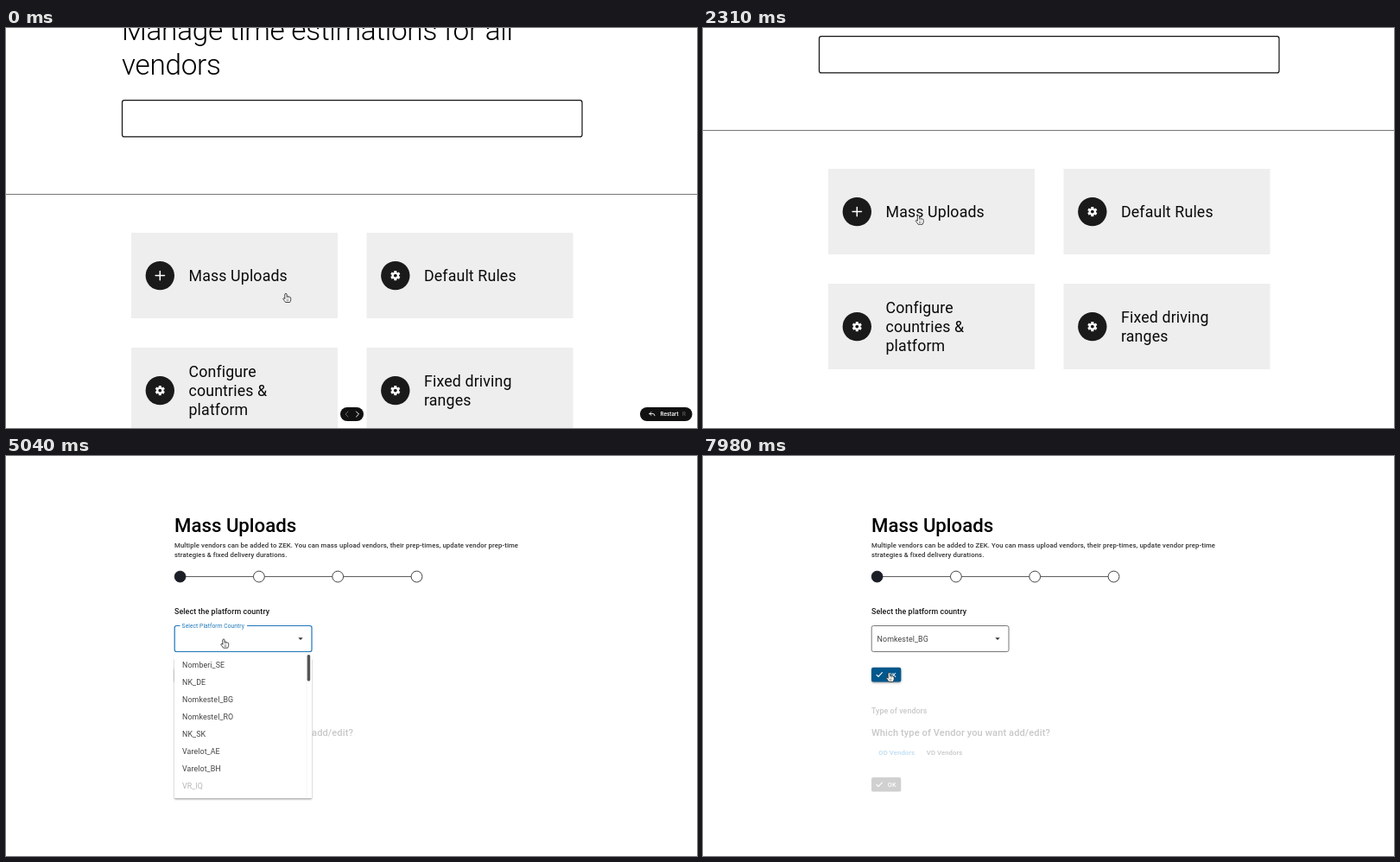
Write an HTML page with a canvas that moves like this. It is 800 by 463 pixels and loops after 8 s.

```html
<!DOCTYPE html>
<html lang="en">
<head>
<meta charset="utf-8">
<title>Mass uploads</title>
<style>
  html, body { margin: 0; width: 100%; height: 100%; overflow: hidden; background: #fff; }
  canvas { display: block; width: 800px; height: 463px; }
</style>
</head>
<body>
<canvas id="stage"></canvas>
<script>
const W = 800, H = 463, LOOP = 8000, STEP = 70;
const PAGE_SWAP = 2450, LIST_OPEN = 4830, LIST_CLOSE = 6510;
const INK = '#1b1e26', BLUE = '#1f78b8';
const canvas = document.getElementById('stage');
const ctx = canvas.getContext('2d');
const dpr = window.devicePixelRatio || 1;
canvas.width = W * dpr;
canvas.height = H * dpr;

const clamp = v => Math.max(0, Math.min(1, v));
const easeOut = p => 1 - (1 - p) ** 3;
const smooth = p => p * p * (3 - 2 * p);

// Pointer tip: time, x, y
const route = [
  [0, 324, 307.2], [630, 299, 250], [910, 296, 247], [1540, 249.5, 217],
  [3500, 249.5, 217], [4130, 232, 191.5], [4340, 232, 191.5], [4690, 252, 210],
  [5110, 252, 212], [5880, 242, 271.7], [6090, 242, 271.7], [6370, 243, 279],
  [6650, 243, 279], [7420, 215.5, 251], [LOOP, 215.5, 251]
];

function pointerAt(t) {
  const i = Math.max(1, route.findIndex(k => k[0] > t));
  const [t0, x0, y0] = route[i - 1], [t1, x1, y1] = route[i];
  const p = smooth(clamp((t - t0) / (t1 - t0)));
  return { x: x0 + (x1 - x0) * p, y: y0 + (y1 - y0) * p };
}

const inside = (p, x, y, w, h) => p.x >= x && p.x <= x + w && p.y >= y && p.y <= y + h;

function text(str, x, y, size, { weight = 400, color = '#0a0a0a', gap = 0, family = 'Roboto' } = {}) {
  ctx.font = `${weight} ${size}px ${family}, sans-serif`;
  ctx.letterSpacing = gap + 'px';
  ctx.fillStyle = color;
  ctx.fillText(str, x, y);
}

function box(x, y, w, h, r, fill, stroke, line = 1) {
  ctx.beginPath();
  ctx.roundRect(x, y, w, h, r);
  if (fill) { ctx.fillStyle = fill; ctx.fill(); }
  if (stroke) { ctx.strokeStyle = stroke; ctx.lineWidth = line; ctx.stroke(); }
}

function disc(x, y, r, fill, stroke) {
  ctx.beginPath();
  ctx.arc(x, y, r, 0, Math.PI * 2);
  ctx.fillStyle = fill;
  ctx.fill();
  if (stroke) { ctx.strokeStyle = stroke; ctx.lineWidth = 0.9; ctx.stroke(); }
}

function path(d, x, y, { fill, stroke, line = 1 }) {
  const shape = new Path2D(d);
  ctx.save();
  ctx.translate(x, y);
  ctx.lineJoin = ctx.lineCap = 'round';
  if (fill) { ctx.fillStyle = fill; ctx.fill(shape); }
  if (stroke) { ctx.strokeStyle = stroke; ctx.lineWidth = line; ctx.stroke(shape); }
  ctx.restore();
}

function withShadow(color, blur, dy, draw) {
  ctx.save();
  ctx.shadowColor = color;
  ctx.shadowBlur = blur * dpr;
  ctx.shadowOffsetY = dy * dpr;
  draw();
  ctx.restore();
}

function gear(x, y) {
  ctx.save();
  ctx.translate(x, y);
  disc(0, 0, 4.2, '#fff');
  for (let i = 0; i < 6; i++) {
    ctx.fillRect(-1.5, -5.6, 3, 3);
    ctx.rotate(Math.PI / 3);
  }
  disc(0, 0, 1.9, '#1a1a1a');
  ctx.restore();
}

function card(x, y, lines, icon) {
  ctx.fillStyle = '#eee';
  ctx.fillRect(x, y, 239, 99);
  const cx = x + 33.3, cy = y + 49.6;
  disc(cx, cy, 16.7, '#1a1a1a');
  if (icon === 'plus') path('M-5.2 0H5.2M0-5.2V5.2', cx, cy, { stroke: '#fff', line: 1.5 });
  else gear(cx, cy);
  lines.forEach((s, i) =>
    text(s, x + 66.5, cy + 6.2 + (i - (lines.length - 1) / 2) * 22, 17.78, { gap: 0.14 }));
}

function homePage(scroll) {
  ctx.save();
  ctx.translate(0, -scroll);
  const title = { weight: 300, color: '#000', gap: -0.278 };
  text('Manage time estimations for all', 134, 13.5, 33.3, title);
  text('vendors', 134, 53.5, 33.3, title);
  box(134.5, 83.7, 532.5, 42.2, 2.5, '#fff', '#111', 1.2);
  ctx.fillStyle = '#777';
  ctx.fillRect(0, 192, W, 1);
  card(145, 237, ['Mass Uploads'], 'plus');
  card(417.5, 237, ['Default Rules']);
  card(145, 370, ['Configure', 'countries &', 'platform']);
  card(417.5, 370, ['Fixed driving', 'ranges']);
  ctx.restore();
}

function toolbar(alpha) {
  if (alpha <= 0) return;
  ctx.save();
  ctx.globalAlpha = alpha;
  box(387, 439, 27, 16, 8, '#111');
  path('M1.5-3L-1.5 0L1.5 3', 394.5, 447, { stroke: '#666' });
  path('M-1.5-3L1.5 0L-1.5 3', 407, 447, { stroke: '#fff' });
  box(734, 439, 60.5, 16, 8, '#111');
  path('M2-2L0 0L2 2M0 0H4Q6 0 6 2.2', 745, 446.5, { stroke: '#fff', line: 0.9 });
  text('Restart', 757.5, 449.2, 6.1, { weight: 600, color: '#fff', family: 'Inter' });
  text('R', 783, 449.2, 6.1, { color: '#777', family: 'Inter' });
  ctx.restore();
}

function okButton(y, fill, shadow) {
  const draw = () => box(195, y, 34.3, 16.6, 2.2, fill);
  if (shadow) withShadow('rgba(0,0,0,.4)', 2.5, 1, draw);
  else draw();
  path('M-3 .2L-1 2.3L3.4-2.4', 204, y + 8.3, { stroke: '#fff', line: 1.1 });
  text('OK', 213.8, y + 10.9, 7.2, { weight: 500, color: '#fff', gap: 0.25 });
}

function stepper() {
  const xs = [0, 1, 2, 3].map(i => 201.6 + i * 91.3);
  ctx.fillStyle = '#555';
  ctx.fillRect(xs[0], 139.1, xs[3] - xs[0], 1);
  xs.forEach((x, i) => disc(x, 139.6, 6.4, i ? '#fff' : INK, i ? '#333' : INK));
}

function selectField(value, open, hover) {
  box(195.2, 196.5, 158.8, 30, 2.2, '#fff', open ? BLUE : hover ? '#222' : '#777', open ? 1.2 : 1);
  path('M-2.7-1.3H2.7L0 1.4Z', 341, 211.6, { fill: '#333' });
  if (open) {
    ctx.fillStyle = '#fff';
    ctx.fillRect(201.5, 195, 77.5, 3);
    text('Select Platform Country', 203.6, 199, 6.67, { color: BLUE, gap: 0.08 });
  } else {
    text(value || 'Select Platform Country', 201.6, 214.5, 8.89, { color: value ? '#444' : '#666', gap: 0.083 });
  }
}

const options = ['Nomberi_SE', 'NK_DE', 'Nomkestel_BG', 'Nomkestel_RO',
  'NK_SK', 'Varelot_AE', 'Varelot_BH', 'VR_IQ'];

function optionList(p) {
  withShadow('rgba(0,0,0,.45)', 2, 1, () => box(195, 228, 159, 168.3, 1, '#fff'));
  ctx.fillStyle = '#fff';
  ctx.fillRect(194, 227.5, 161, 8);
  options.forEach((name, i) => {
    const y = 232.2 + i * 19.95;
    if (inside(p, 195, y, 152, 19.9)) {
      ctx.fillStyle = '#f4f4f4';
      ctx.fillRect(195.5, y, 152, 19.95);
    }
    text(name, 204, y + 13.1, 8.89, { color: i === 7 ? '#b5b5b5' : '#444', gap: 0.083 });
  });
  ctx.fillStyle = '#f5f5f5';
  ctx.fillRect(347.5, 229, 1, 166);
  box(348.7, 230, 3.5, 30.5, 1.6, '#555');
}

function uploadPage(t, p) {
  const open = t >= LIST_OPEN && t < LIST_CLOSE;
  const picked = t >= LIST_CLOSE;
  text('Mass Uploads', 195, 88, 22.2, { weight: 500, color: '#000' });
  const intro = { weight: 500, color: '#333', gap: 0.1 };
  text('Multiple vendors can be added to ZEK. You can mass upload vendors, their prep-times, update vendor prep-time',
    195, 106, 7.78, intro);
  text('strategies & fixed delivery durations.', 195, 117.2, 7.78, intro);
  stepper();
  text('Select the platform country', 195, 183, 8.89, { weight: 500, color: '#1a1a1a', gap: 0.07 });
  selectField(picked ? options[2] : '', open, overSelect(p));

  okButton(244.8, overOk(p) && !open ? '#00578c' : INK, true);
  const faded = { weight: 500, color: '#c8c8c8', gap: 0.06 };
  text('Type of vendors', 195, 298, 8.89, faded);
  text('Which type of Vendor you want add/edit?', 195, 324.2, 11.11, { ...faded, gap: 0.083 });
  text('OD Vendors', 203.3, 346.4, 7.78, { ...faded, color: '#bcdcf0' });
  text('VD Vendors', 258.8, 346.4, 7.78, faded);
  okButton(372, '#d0d0d0');
  if (open) optionList(p);
}

const overSelect = p => inside(p, 195, 196, 159, 31);
const overOk = p => inside(p, 195, 245, 34, 17);

function pointer(p, hand) {
  if (hand) {
    path('M-1.2 5.8V.8Q0-.9 1.1 .8V3.4Q2.2 2.7 2.9 3.8Q4.1 3.2 4.5 4.4Q5.8 4.2 5.7 5.6V7.6Q5.4 9 4.6 10.3H-.4Q-1.6 8.4-3.3 6.3Q-3.2 4.8-1.2 5.8Z',
      p.x, p.y, { fill: '#fff', stroke: '#333', line: 0.9 });
    path('M1.1 3.6V5.2M2.9 4V5.4M1 7V8.7M2.6 7V8.7', p.x, p.y, { stroke: '#444', line: 0.6 });
  } else {
    const arrow = 'M0 0V8L1.8 6.4L3 9.2L4.4 8.6L3.2 5.9H5.5Z';
    path(arrow, p.x, p.y, { stroke: '#fff', line: 1.2 });
    path(arrow, p.x, p.y, { fill: '#111' });
  }
}

function render(t) {
  ctx.setTransform(dpr, 0, 0, dpr, 0, 0);
  ctx.fillStyle = '#fff';
  ctx.fillRect(0, 0, W, H);
  const p = pointerAt(t);
  if (t < PAGE_SWAP) {
    homePage(Math.round(74 * easeOut(clamp(t / 490))));
    toolbar(1 - clamp((t - 280) / 210));
    pointer(p, true);
  } else {
    const open = t >= LIST_OPEN && t < LIST_CLOSE;
    uploadPage(t, p);
    pointer(p, overSelect(p) || overOk(p) || (open && inside(p, 195, 228, 159, 169)));
  }
}

function tick(now) {
  const t = now % LOOP;
  render(Math.floor(t / STEP) * STEP);
  requestAnimationFrame(tick);
}
render(0);
requestAnimationFrame(tick);
</script>
</body>
</html>
```
